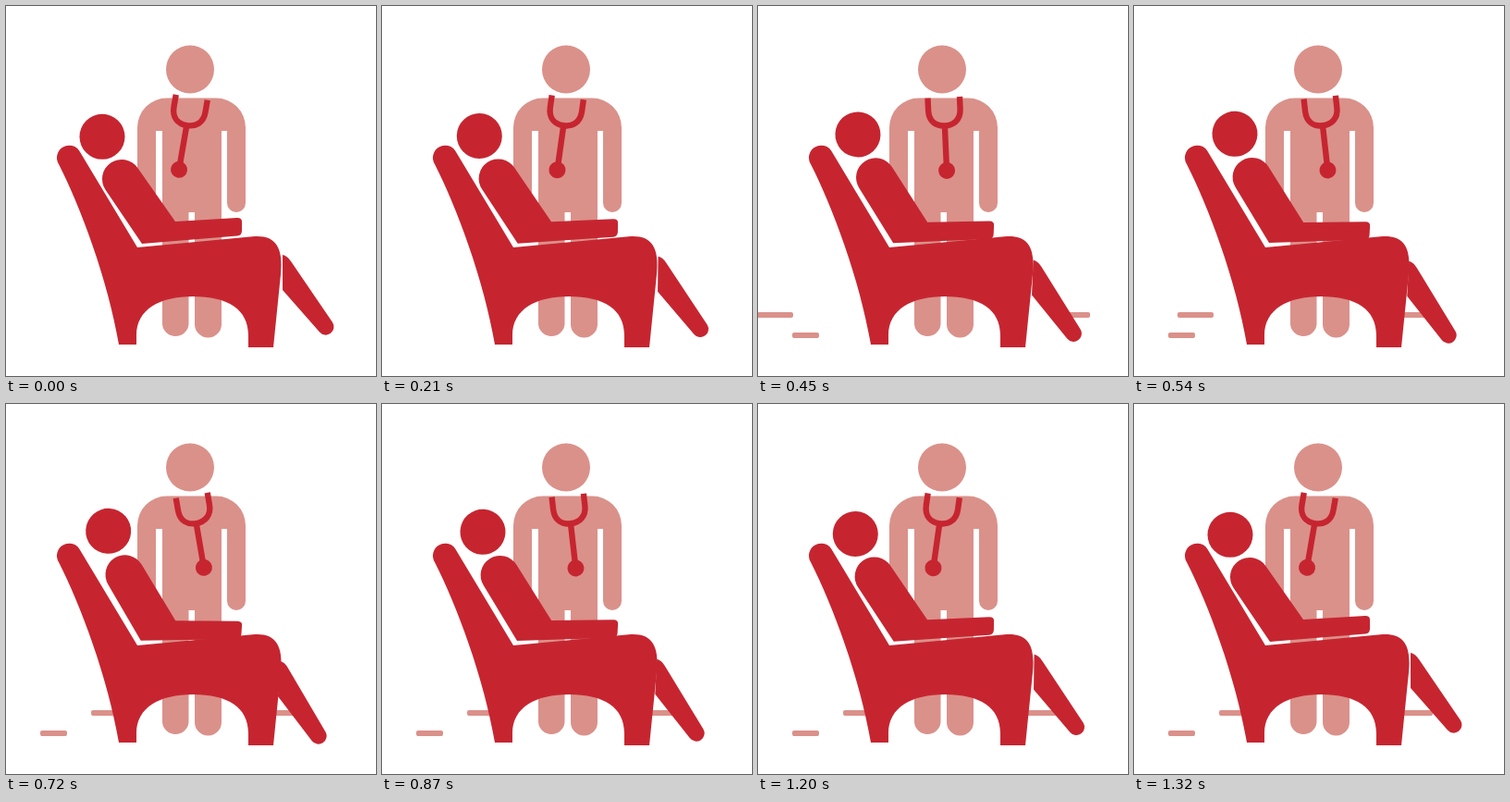
Animation of 400x400 px, one loop 1.35 s. Source, as an HTML page:

```html
<!DOCTYPE html>
<html lang="en">
<head>
<meta charset="utf-8">
<title>Patient in a recliner</title>
<style>
  html, body { margin: 0; height: 100%; overflow: hidden; background: #fff; }
  svg { display: block; width: 100%; height: 100%; }
  .pale { fill: #da918a; }
  .red { fill: #c62530; }
</style>
</head>
<body>
<svg viewBox="0 0 400 400">
  <g class="pale">
    <rect id="shortDash" y="353" width="29" height="6" rx="2"/>
    <rect id="leftDash" y="331" width="39" height="6" rx="2"/>
    <rect id="rightDash" y="331" width="39" height="6" rx="2"/>
  </g>

  <g id="doctor" class="pale">
    <circle cx="199" cy="68.5" r="26"/>
    <path d="M174 99.5H227A32 32 0 0 1 259 131.5V213a10 10 0 0 1 -20 0V135H233V344a14.5 14.5 0 0 1 -29 0V223H197.5V344a14.3 14.3 0 0 1 -28.5 0V135H162V213a10 10 0 0 1 -20 0V131.5A32 32 0 0 1 174 99.5Z"/>
  </g>

  <g id="stethoscope">
    <path d="M183.5 98.8V112C183.5 124 191 129.5 200.5 129.5S218 124 218 112V98.8M200.5 130V174" fill="none" stroke="#c62530" stroke-width="6.4"/>
    <circle class="red" cx="200.5" cy="178" r="9"/>
  </g>

  <path id="chair" class="red" d="M57 171C81 218 110 296 122 366H141V356C141 328 166 314 202 314C240 314 262 328 262 356V369H289L297 290C300 260 291 248 269 249L142 261L79.500 157A12.700 12.700 0 0 0 57 171Z"/>

  <g id="patient" class="red">
    <circle cx="104" cy="141.300" r="24.500"/>
    <path d="M107.700 199A21 21 0 0 1 142.300 175L183 233L250 229Q255 229 255 233V243Q255 248 250 248.500L147 257Z"/>
    <path d="M299 269Q304 270 308 276L353 342A8.800 8.800 0 0 1 339 352.600L299 307Z"/>
  </g>
</svg>
<script>
  const LOOP = 1350, STEP = 30, REST = 90, HALF = 615, SPEED = 16 / 30;
  const el = id => document.getElementById(id);
  const place = (id, x) => el(id).setAttribute('x', x);
  const rotate = (id, angle, x, y) =>
    el(id).setAttribute('transform', `rotate(${angle} ${x} ${y})`);

  function draw() {
    const t = Math.floor(performance.now() % LOOP / STEP) * STEP;

    // After a short rest: 0 to 2 covers the way out and back
    const phase = t <= REST ? 0 : (t - REST) / HALF;
    rotate('stethoscope', 9.8 * Math.cos(Math.PI * phase), 200.5, 99);
    rotate('patient', 4 * (1 - Math.abs(1 - phase)), 165, 237.5);

    // Floor dashes slide in and stay until the loop restarts
    place('shortDash', Math.min(37, 21 + SPEED * (t - 330)));
    place('leftDash', Math.min(92, 47 + SPEED * (t - 540)));
    place('rightDash', Math.max(284, 384 - SPEED * (t - 330)));

    requestAnimationFrame(draw);
  }
  draw();
</script>
</body>
</html>
```
